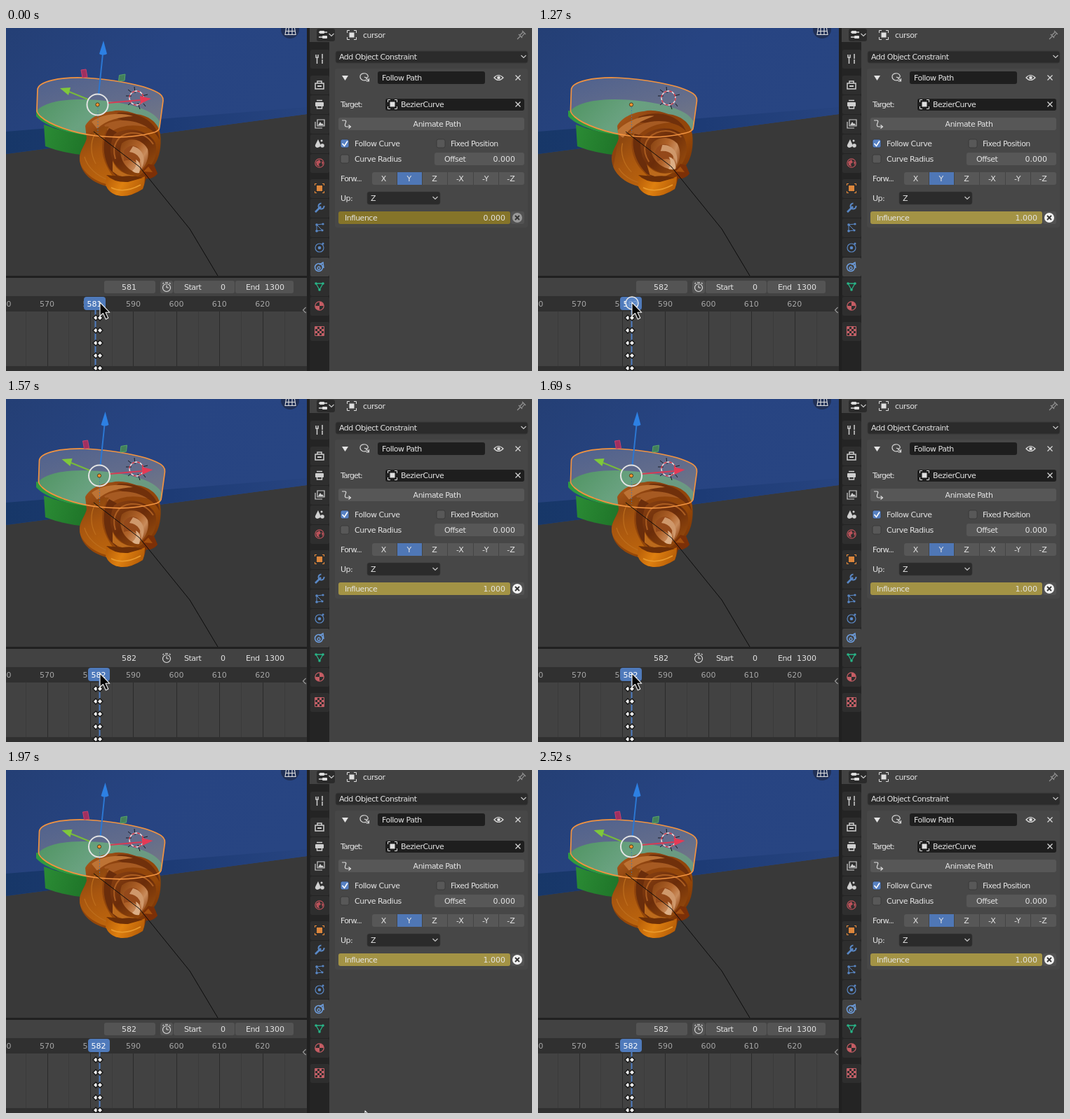
Animation, 750 px wide and 490 px high, one loop 2.67 s. Source, as an HTML page:

```html
<!DOCTYPE html>
<html lang="en">
<head>
<meta charset="utf-8">
<title>Constraint panel</title>
<style>
html, body { margin: 0; width: 100%; height: 100%; overflow: hidden; background: #424242; }
svg { display: block; width: 750px; height: 490px; }
text { font: 11px "DejaVu Sans", Verdana, sans-serif; fill: #e4e4e4; white-space: pre; }
</style>
</head>
<body>
<svg id="stage" viewBox="0 0 750 490" xmlns="http://www.w3.org/2000/svg"></svg>
<script>
const LOOP = 2670;
const stage = document.getElementById('stage');

// markup helpers
const rect = (x, y, w, h, fill, r = 0, more = '') =>
  `<rect x="${x}" y="${y}" width="${w}" height="${h}" rx="${r}" fill="${fill}" ${more}/>`;
const path = (d, fill, more = '') => `<path d="${d}" fill="${fill}" ${more}/>`;
const line = (d, color, w = 1, more = '') =>
  path(d, 'none', `stroke="${color}" stroke-width="${w}" ${more}`);
const disc = (x, y, r, fill, more = '') => `<circle cx="${x}" cy="${y}" r="${r}" fill="${fill}" ${more}/>`;
const ring = (x, y, r, color, w = 1.5, more = '') =>
  disc(x, y, r, 'none', `stroke="${color}" stroke-width="${w}" ${more}`);
const label = (s, x, y, more = '', gap = -0.5) =>
  `<text x="${x}" y="${y}" letter-spacing="${gap}" ${more}>${s}</text>`;
const num = (s, x, y, anchor = 'end', more = '') =>
  label(s, x, y, `text-anchor="${anchor}" ${more}`, 0);
const group = (id, body, more = '') => `<g id="${id}" ${more}>${body}</g>`;
const chevron = (x, y, c = '#c8c8c8') => line(`M${x - 3.5} ${y - 2}l3.5 3.5l3.5 -3.5`, c, 1.2);
const cross = (x, y, c = '#dcdcdc', s = 3.5, w = 1.2) =>
  line(`M${x - s} ${y - s}l${2 * s} ${2 * s}m0 ${-2 * s}l${-2 * s} ${2 * s}`, c, w);
const at = (x, y, body) => `<g transform="translate(${x} ${y})">${body}</g>`;
const objIcon = (x, y, c = '#e0e0e0') => at(x, y,
  rect(-3.5, -3.5, 7, 7, c) +
  line('M-6.5 -3V-6.5H-3M3 -6.5H6.5V-3M6.5 3V6.5H3M-3 6.5H-6.5V3', c, 1));
const followIcon = (x, y) => at(x, y,
  line('M3 3C-1 5 -6 3 -6 -1.5C-6 -7 3 -8 5 -3C6 0 3 1 0 -1M2 0L6.5 4.5M6.5 1V4.8H2.5', '#d4d4d4', 1.2));

const stop = (o, c) => `<stop offset="${o}" stop-color="${c}"/>`;
const grad = (id, x2, y2, ...stops) =>
  `<linearGradient id="${id}" x2="${x2}" y2="${y2}">${stops.join('')}</linearGradient>`;

const bladeShape = 'M113 140C119 128 136 120 151 119C162 116 175 119 186 123C203 125 218 135 220 152' +
  'C222 168 219 186 211 196L216 208Q210 216 200 215L195 230Q178 241 164 240Q148 238 143 226' +
  'C120 220 104 204 105 184C106 174 112 168 115 158Z';

const defs = `<defs>
  ${grad('wall', 1, 0.4, stop(0, '#243f75'), stop(0.5, '#274482'), stop(1, '#284582'))}
  ${grad('band', 1, 0, stop(0, '#173768'), stop(0.55, '#1d3b75'), stop(1, '#274480'))}
  ${grad('side', 1, 0.2, stop(0, '#2b8c35'), stop(1, '#1f7529'))}
  ${grad('glass', 0.6, 1, stop(0, '#53648f'), stop(0.6, '#68708c'), stop(1, '#7a7c85'))}
  ${grad('green', 1, 0.3, stop(0, '#4f9760'), stop(0.5, '#69a47f'), stop(1, '#6b9a82'))}
  ${grad('copper', 0.8, 1, stop(0, '#b3621f'), stop(0.3, '#8c420f'), stop(0.65, '#964808'), stop(1, '#6c2b06'))}
  ${grad('fan', 0.35, 1, stop(0, '#80400f'), stop(0.5, '#a8560f'), stop(1, '#bb640d'))}
  ${grad('lip', 1, 0.3, stop(0, '#b35a07'), stop(0.5, '#de8010'), stop(1, '#b96008'))}
  ${grad('ringTone', 0.8, 1, stop(0, '#8a4212'), stop(0.5, '#6a2c0a'), stop(1, '#9a4d0c'))}
  ${grad('hub', 1, 0.8, stop(0, '#84400f'), stop(0.5, '#b0632a'), stop(0.75, '#c98c5c'), stop(1, '#8f4212'))}
  <clipPath id="view"><rect width="429" height="354"/></clipPath>
  <clipPath id="blade"><path d="${bladeShape}"/></clipPath>
  <clipPath id="tracks"><rect y="357" width="429" height="133"/></clipPath>
</defs>`;

function propeller() {
  const inner =
    path('M160 121C188 119 216 133 219 160C213 146 196 137 178 135C166 133 160 129 152 127Z', '#70300b') +
    path('M122 134C138 122 163 120 181 126C163 127 143 131 130 144Z', '#bd7335') +
    path('M140 139C158 128 184 131 202 142C184 137 163 138 147 150Z', '#a65a22') +
    path('M116 158C122 144 135 140 147 141C136 154 133 177 144 198C150 210 157 219 165 226C130 226 103 204 104 182Z', 'url(#fan)') +
    path('M147 143C137 158 137 182 148 202L160 214C149 190 147 164 158 149Z', '#6a2d0b') +
    line('M112 184C116 200 131 212 148 218M127 151C120 163 120 180 128 194', '#bd6d1c', 1.2) +
    path('M154 152C171 140 202 144 213 164C217 180 211 194 199 204L188 212C168 212 150 195 149 177C149 167 151 158 154 152Z', 'url(#ringTone)') +
    line('M156 187C150 168 159 152 178 150C192 149 203 155 210 166', '#ab5c20', 2) +
    path('M165 165C175 155 194 158 202 173C205 187 198 201 187 207C171 203 158 184 165 165Z', 'url(#hub)') +
    path('M168 176C176 164 190 167 193 179L190 196C185 190 177 187 168 190Z', '#94491a') +
    path('M181 169C195 172 201 187 193 201C194 188 189 179 176 177Z', '#cf986b') +
    path('M185 188Q194 192 190 207Q184 208 180 204Q188 198 185 188Z', '#dcae85') +
    path('M152 190C157 203 169 210 184 211Q166 217 152 205Z', '#bb6a1c');
  return path(bladeShape, 'url(#copper)') +
    `<g clip-path="url(#blade)">${group('spin', inner)}` +
    path('M143 210C151 221 174 222 198 212L197 230Q178 243 158 242L142 228Z', 'url(#lip)') +
    path('M143 210Q154 221 174 220L195 214Q181 210 166 212Z', '#6c2f07') +
    line('M150 228Q168 237 192 224', '#ea9a2c', 1.6) + '</g>' +
    path('M194 204L203 194L211 196L216 208Q209 216 200 215Z', '#7c3007') +
    path('M196 205L203 198L209 206Z', '#a4500f');
}

function cursor3d() {
  return at(186, 100,
    line('M-15 -3H-7M8 -3L16 -5M-3 -16L-2 -7M2 7L5 16M-12 -12L-7 -8M-12 10L-7 6M10 8L13 12', '#161a22', 1) +
    ring(0, 0, 10, '#f0dede', 1.4) +
    ring(0, 0, 10, '#d02b3c', 1.4, 'stroke-dasharray="4 4"'));
}

function gizmo() {
  return path('M107 60L114 59L116 70L109 71Z', '#a03060', 'stroke="#c8406c"') +
    path('M161.500 67.500L170 66L169 75L160.500 76Z', '#43805c', 'stroke="#57a568"') +
    line('M132 95L138 37', '#2c77d2', 2) + path('M139 18L144 37Q138 40 133 37Z', '#2d80e3') +
    line('M117 102L90 91', '#78b93b', 2) + path('M77 86L92 85L89 96Z', '#7fc83b') +
    line('M146 107L191 103', '#d63b55', 2) + path('M207 101L191 97L192 108Z', '#e53a55') +
    ring(130.5, 109.5, 15, '#e4e4e4', 2);
}

function viewport() {
  const rim = 'C185 156 155 157 128 154C95 150 62 138 50 127';
  const shell = `M45 88C46 76 78 70 110 71C150 73 195 81 214 91Q225 96 224 104L219 141Q219 148 208 150${rim}Q43 121 44 116Z`;
  const floorDisc = `M44 118C60 101 105 99 150 105C190 111 213 120 220 135L219 141Q219 148 208 150${rim}Z`;
  return `<g clip-path="url(#view)">` +
    rect(0, 0, 429, 354, '#393939') +
    path('M0 0H429V123L0 180Z', 'url(#wall)') +
    path('M0 148L429 113V123L0 180Z', 'url(#band)') +
    disc(405, 2, 13, '#1f2c4c', 'opacity=".8"') +
    line('M399.500 0L398 9.500H413L411.500 0M398.500 4.500H412.500M403 0V9.500M408 0V9.500', '#e0e0e0', 1.1) +
    path('M43 118V126Q54 140 100 152L135 157V148L60 122Z', '#2f9b40') +
    path('M54 138L56 169Q82 179 115 182L121 154Q82 149 54 138Z', 'url(#side)') +
    group('fill', path(shell, 'url(#glass)', 'opacity=".92"') + path(floorDisc, 'url(#green)', 'opacity=".95"')) +
    propeller() +
    group('edge', path(shell, 'none', 'stroke="#f29340" stroke-width="1.7"') +
      line('M131 113V150', '#4777a8', 0.8, 'stroke-dasharray="2 2"')) +
    line('M125 148L190 198L262 287L302 354', '#0c0c0c', 1) +
    cursor3d() + group('gizmo', gizmo()) +
    group('origin', disc(130.5, 109.5, 2.6, '#f5962f', 'stroke="#332211" stroke-width=".8"')) +
    '</g>';
}

function timeline() {
  const x = f => 120 + (f - 580) * 6.145;
  let s = rect(0, 354, 432, 136, '#202020') + rect(0, 357, 429, 26, '#424242') +
    rect(0, 383, 429, 22, '#303030') + rect(0, 405, 429, 85, '#424242');
  for (let f = 565; f < 630; f += 5)
    s += line(`M${Math.round(x(f)) + 0.5} 405V490`, f % 10 ? '#3b3b3b' : '#2b2b2b');
  s += rect(0, 483, 429, 7, '#303030');
  for (let f = 560; f < 630; f += 10) s += num(f, x(f), 398, 'middle', 'style="fill:#a6a6a6"');
  s += group('fields', rect(140, 361, 73, 18, '#545454', 3) + rect(220, 361, 18, 18, '#545454', 3) +
    rect(239, 361, 87, 18, '#545454', 3) + rect(327, 361, 83, 18, '#545454', 3));
  s += group('frameNo', '') +
    ring(229, 371, 5.5, '#d8d8d8', 1.2) +
    line('M229 371V367.500M229 371H232M227 363.500H231M223.500 365.500L225 364M234.500 365.500L233 364', '#d8d8d8', 1.2) +
    label('Start', 254, 374) + num('0', 313, 374) + label('End', 342, 374) + num('1300', 397, 374);
  s += group('bar', rect(422, 405, 6, 70, '#606060', 3)) + line('M427.500 399L423.500 403L427.500 407', '#9a9a9a', 1.1);
  s += group('head', line('M0.500 400V490', '#4f7dc0', 2));
  for (let y = 414; y < 490; y += 18)
    for (const k of [128, 134])
      s += path(`M${k - 4} ${y}l4 -4l4 4l-4 4Z`, '#ececec', 'stroke="#141414" stroke-width="1.3"');
  s += group('badge', rect(-15.5, 384, 31, 19, '#4f7abb', 4) + group('badgeNo', ''));
  return `<g clip-path="url(#tracks)">${s}</g>` + rect(0, 354, 432, 3, '#202020');
}

const tabIcons = [
  [44, '#d0d0d0', c => line('M-5 -6V-2H-2V-6M-3.500 -2V7M4 -7V0M4 1V7', c, 1.5)],
  [81, '#d0d0d0', c => line('M-6 -2H6V6H-6ZM-3 -2V-5H3V-2', c, 1.5) + line('M-3 2H3', c, 2)],
  [109, '#d0d0d0', c => rect(-6, -3, 12, 6, c, 1) + line('M-4 -5.500H4M-3.500 2V6H3.500V2', c, 1.4)],
  [137, '#d0d0d0', c => line('M-3 -6H7V3H-3ZM-6 -3V6H4', c, 1.2) + path('M-2 2L1 -3L3 0L4 -1L6 2Z', c)],
  [165, '#d0d0d0', c => path('M-2 -6L2 3Q0 6 -3 6Q-7 5 -6 2Z', c) + disc(4, 3, 2.8, c) + disc(3, -4, 1.5, c)],
  [193, '#b9525a', c => ring(0, 0, 6.2, c, 1.2) + path('M-5 -2L0 -5L2 -1L-1 1L0 5L-4 3ZM3 -3L6 -1L4 3Z', c)],
  [229, '#dd873c', c => rect(-4, -4, 8, 8, c) + line('M-6.500 -4V-6.500H-4M4 -6.500H6.500V-4M6.500 4V6.500H4M-4 6.500H-6.500V4', c, 1.1)],
  [257, '#5a88c6', c => line('M-6 6L2 -2', c, 2.6) + line('M6.500 -3A4 4 0 1 1 2.500 -6.500', c, 2)],
  [285, '#5a88c6', c => line('M-4 5V-4L5 -5M-4 5L4 4M-4 -4L4 4', c, 1) + disc(-4, -4, 1.8, c) + disc(-4, 5, 1.8, c) + disc(5, -5, 1.6, c) + disc(4, 4, 1.6, c)],
  [313, '#5a88c6', c => ring(0, 1, 6, c, 1.2) + disc(0, 1, 2.3, c) + disc(5, -5, 1.5, c)],
  [341, '#6e9fe0', c => ring(-1, 1, 5.5, c, 1.5) + ring(-1, 2, 2, c, 1.3) + line('M0 -3L5 -6L6 2', c, 1.5)],
  [369, '#28b487', c => line('M-5 -4H5L0 5Z', c, 1.3) + disc(-5, -4, 1.8, c) + disc(5, -4, 1.8, c) + disc(0, 5, 1.8, c)],
  [397, '#c65d64', c => ring(0, 0, 6.2, c, 1.3) + path('M0 0V-6A6 6 0 0 1 6 0ZM0 0V6A6 6 0 0 1 -6 0Z', c)],
  [433, '#c25f66', c => {
    let s = line('M-6.500 -6.500H6.500V6.500H-6.500Z', c, 1);
    for (let i = 0; i < 16; i++)
      if ((i + (i >> 2)) % 2 === 0) s += rect(-6 + 3 * (i % 4), -6 + 3 * (i >> 2), 3, 3, c);
    return s;
  }]
];

function tabs() {
  return rect(433, 20, 28, 470, '#242424') + tabIcons.map(([y, c, draw]) =>
    rect(434, y - 13, 27, 27, y === 341 ? '#424242' : '#2e2e2e', 2) + at(447, y, draw(c))).join('');
}

function panel() {
  const field = '#1e1e1e', btn = '#575757', menu = '#2b2b2b';
  let s = rect(429, 0, 4, 490, '#202020') + rect(433, 0, 317, 490, '#424242') + tabs() +
    rect(443, 1, 26, 18, menu, 3) +
    line('M446 6H450M454 6H458M446 13H452', '#dedede', 1.6) + rect(447, 4, 7, 4, '#dedede', 1) +
    rect(451, 11, 7, 4, '#dedede', 1) + chevron(464, 10) +
    objIcon(493, 10) + label('cursor', 509, 14) +
    at(735, 10, line('M-6 6L-2 2M-4 -1L1 4M-2 0L2 -4M1 -6L6 -1M0.500 2.500L4 -2', '#929292', 1.2)) +
    rect(470, 33, 274, 17, menu, 3, 'stroke="#383838"') + label('Add Object Constraint', 475, 45) + chevron(738, 41) +
    rect(469, 58, 275, 227, '#474747', 3) +
    path('M479 68H488L483.500 75Z', '#e4e4e4') + followIcon(511, 71) +
    rect(530, 62, 153, 18, field, 3) + label('Follow Path', 536, 75) +
    line('M696 71Q702 64 709 71Q702 78 696 71Z', '#dedede', 1.2) + disc(702.5, 71, 2.3, '#dedede') + cross(730, 71) +
    label('Target:', 477, 113, '', -1) + rect(541, 101, 198, 17, field, 3) + objIcon(551, 109) +
    label('BezierCurve', 563, 113) + cross(730, 109) +
    rect(474, 128, 265, 18, btn, 3) +
    line('M479 132H483Q486 132 484 136Q482 141 486 141H491M488.500 138.500L491.500 141L488.500 143.500', '#dcdcdc', 1.2) +
    label('Animate Path', 614.5, 141, 'text-anchor="middle"');
  const box = (x, y, on) => rect(x, y, 12, 12, on ? '#5680c2' : '#585858', 2.5, 'stroke="#363636" stroke-width=".8"') +
    (on ? line(`M${x + 2.5} ${y + 6}l3 3.500l4.500 -7`, '#fff', 1.6) : '');
  s += box(477, 159, true) + label('Follow Curve', 497, 169) + box(614, 159) + label('Fixed Position', 634, 169) +
    box(477, 181) + label('Curve Radius', 497, 191) +
    rect(611, 178, 128, 18, btn, 3) + label('Offset', 625, 191) + num('0.000', 726, 191) +
    label('Forw...', 477, 219, '', -0.8) + rect(522, 206, 217, 18, btn, 3);
  ['X', 'Y', 'Z', '-X', '-Y', '-Z'].forEach((axis, i) => {
    const x = 521 + i * 36.3;
    if (i === 1) s += rect(557, 206, 36, 18, '#4f77b6');
    if (i) s += line(`M${Math.floor(x) + 0.5} 206V224`, '#444');
    s += label(axis, x + 17.5, 219, 'text-anchor="middle"', 0);
  });
  return s + label('Up:', 477, 247) + rect(515, 234, 104, 18, menu, 3, 'stroke="#383838" stroke-width=".6"') +
    label('Z', 520, 247) + chevron(612, 243) +
    rect(474, 262, 245, 18, '#857429', 3, 'id="slider"') + label('Influence', 483, 275) + group('influence', '') +
    rect(720, 262, 19, 18, '#525252', 3) + disc(729, 271, 7, '#999', 'id="keyDot"') + cross(729, 271, '#333', 3, 1.8);
}

const pointer = path('M0 0V19.500L4.500 15.500L8.300 24L11.800 22.300L8 14.300H13.800Z', '#050505',
  'stroke="#f2f2f2" stroke-width="1.1" stroke-linejoin="round"');

stage.innerHTML = defs + viewport() + timeline() + panel() +
  group('click', disc(134, 393, 9, '#5f8bca', 'fill-opacity=".75" stroke="#eee" stroke-width="1.4"')) +
  group('pointer', pointer);

const $ = id => document.getElementById(id);
const show = (id, on) => $(id).setAttribute('display', on ? 'inline' : 'none');
const move = (id, x, y = 0) => $(id).setAttribute('transform', `translate(${x} ${y})`);

// [start ms, x, y]; the pointer jumps between these places
const stops = [[0, 134, 392], [1700, 262, 436], [1820, 416.5, 469], [1970, 512, 487],
  [2120, 612, 494], [2250, 703, 478], [2400, 725, 479], [2520, 760, 500]];
const turns = [[0, 0], [1140, -32], [1270, -16], [1420, 0]];
const pick = (list, t) => list.filter(k => k[0] <= t).pop();

function draw(t) {
  const next = t >= 1140, busy = next && t < 1570;
  const frame = next ? 582 : 581, dx = next ? 2.5 : 0;
  for (const id of ['fill', 'edge', 'gizmo', 'origin']) move(id, dx);
  show('gizmo', !busy);
  show('click', busy);
  show('fields', t < 1570 || t >= 1970);
  show('bar', t >= 1820 && t < 1970);
  $('spin').setAttribute('transform', `rotate(${pick(turns, t)[1]} 172 181)`);
  move('head', next ? 133 : 127);
  move('badge', next ? 132.5 : 126.5);
  $('frameNo').innerHTML = num(frame, 175.5, 374, 'middle');
  $('badgeNo').innerHTML = num(frame, -0.5, 398, 'middle', 'style="fill:#fff"');
  $('influence').innerHTML = num(next ? '1.000' : '0.000', 712, 275);
  $('slider').setAttribute('fill', next ? '#a39345' : '#857429');
  $('keyDot').setAttribute('fill', next ? '#f2f2f2' : '#999');
  const [, x, y] = pick(stops, t);
  move('pointer', x, y);
}

const t0 = performance.now();
function tick() {
  draw((performance.now() - t0) % LOOP);
  requestAnimationFrame(tick);
}
tick();
</script>
</body>
</html>
```
